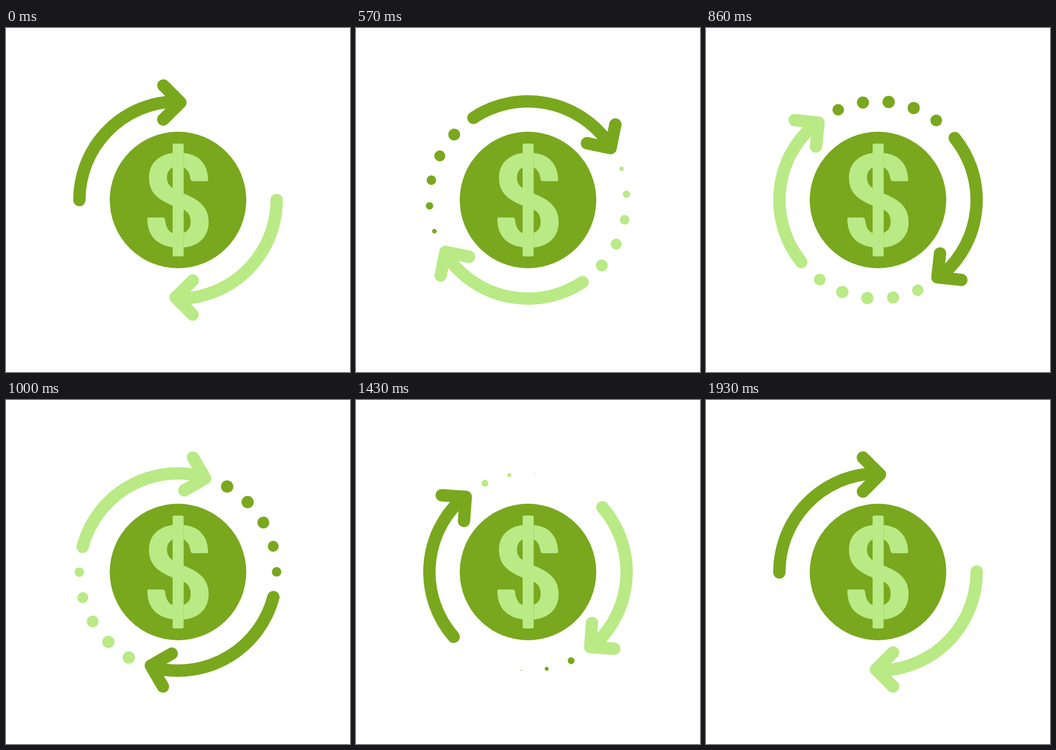
An HTML page that plays this animation: 640x640 px, repeating every 3000 ms.

```html
<!DOCTYPE html>
<html lang="en">
<head>
<meta charset="utf-8">
<title>Money cycle</title>
<style>
  html, body { margin: 0; width: 100%; height: 100%; overflow: hidden; background: #fff; }
  svg { display: block; width: 100%; height: 100%; }
  .dark { --c: #79a81e; }
  .light { --c: #b9ea86; }
  .fill, circle { fill: var(--c); }
  .line { fill: none; stroke: var(--c); stroke-width: 23; stroke-linecap: round; stroke-linejoin: round; }
</style>
</head>
<body>
<svg viewBox="0 0 640 640">
  <circle class="dark" cx="320" cy="320" r="127"/>
  <g class="light">
    <rect class="fill" x="310" y="215" width="20.5" height="210" rx="3"/>
    <path class="fill" d="M310 232.5C284 236 266 252 266 278C266 307 283 319 310 330.5L330.5 338C340 343 343.5 350 343.5 361C343.5 371 339 378 330.5 381V408.5C357 406 377 390 377 361C377 332 358 319 330.5 308L310 298C303 293 299.5 287 299.5 278C299.5 270 303 263 310 259.500Z"/>
    <path class="fill" d="M330.5 232.5C358 235 375.5 252 376 283Q376 285 374 285H348Q343.500 285 343 280C341.500 270 338 263 330.500 259.500Z"/>
    <path class="fill" d="M310 408C282 404 263 388 263 355Q263 352.500 265.500 352.500H291Q295.500 352.500 296 357C297.500 371 302 378 310 381.500Z"/>
  </g>
  <g id="dark" class="dark"></g>
  <g id="light" class="light"></g>
</svg>
<script>
const LOOP = 3000, STEP = 1000 / 14, LAST = 27;
const DOTS = 5, GAP = 15, ORBIT = 183.5, DOT_R = 11.5, STAGGER = 1.15;

const clamp = v => Math.min(1, Math.max(0, v));

// Cubic bezier easing with handles (a, 0) and (b, 1)
function ease(a, b, x) {
  x = clamp(x);
  if (x === 0 || x === 1) return x;
  let lo = 0, hi = 1, s = 0.5;
  for (let i = 0; i < 30; i++) {
    s = (lo + hi) / 2;
    const q = 1 - s;
    if (3 * a * s * q * q + 3 * b * s * s * q + s * s * s < x) lo = s;
    else hi = s;
  }
  return s * s * (3 - 2 * s);
}

const grow = n => ease(0.22, 0.34, (n - 1) / 9);

function add(parent, tag, attrs) {
  const el = document.createElementNS("http://www.w3.org/2000/svg", tag);
  for (const key in attrs) el.setAttribute(key, attrs[key]);
  return parent.appendChild(el);
}

function makeArrow(id, turn) {
  const group = document.getElementById(id);
  add(group, "path", { class: "line", d: "M136.5 320.5A183.5 183.5 0 0 1 312 136.7" });
  add(group, "path", { class: "line", d: "M292.3 107L324 138.6L292.3 170.2" });
  const dots = [];
  for (let k = 1; k <= DOTS; k++) {
    dots.push(add(group, "circle", {
      cx: 320 - ORBIT, cy: 320, transform: `rotate(${-GAP * k} 320 320)`
    }));
  }
  return { group, dots, turn };
}

const arrows = [makeArrow("dark", 0), makeArrow("light", 180)];

function draw(ms) {
  const n = Math.min(LAST, Math.floor((ms % LOOP + 5) / STEP));
  const angle = 360 * ease(0.525, 0.475, (n + 0.5) / 27.9);
  for (const { group, dots, turn } of arrows) {
    group.setAttribute("transform", `rotate(${angle + turn} 320 320)`);
    dots.forEach((dot, i) => {
      const up = grow(n - STAGGER * i);
      const down = grow(24.3 - n - STAGGER * (DOTS - 1 - i));
      dot.setAttribute("r", DOT_R * Math.min(up, down));
    });
  }
}

const start = performance.now();
function tick() {
  draw(performance.now() - start);
  requestAnimationFrame(tick);
}
tick();
</script>
</body>
</html>
```
